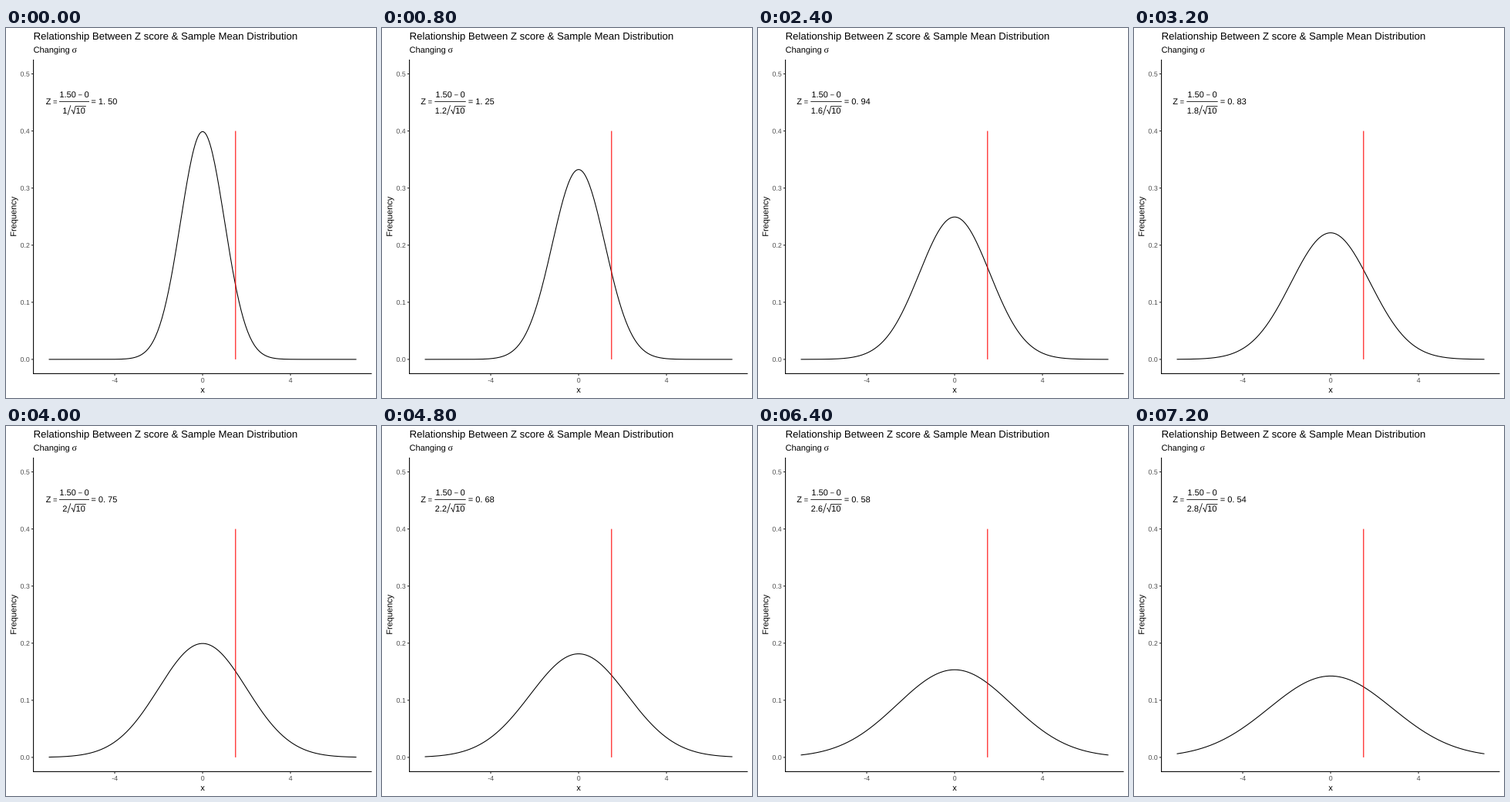
A matplotlib script for the animation above (8 s loop, 480 px wide and 480 px high).

```python
import numpy as np
import matplotlib.pyplot as plt
from matplotlib.animation import FuncAnimation
from matplotlib.patches import PathPatch
from matplotlib.textpath import TextPath
from matplotlib.transforms import Affine2D

SIZE = 480
STEPS = 10
STEP_MS = 800
LINE = 1.07
LEFT, RIGHT, TOP, BOTTOM = 35.6, 474.5, 41, 448.4
DARK, GREY = "#333333", "#4d4d4d"

# At 72 dpi one point is one pixel; the axes use pixel units with y downwards.
fig = plt.figure(figsize=(SIZE / 72, SIZE / 72), dpi=72, facecolor="white")
ax = fig.add_axes([0, 0, 1, 1])
ax.set_xlim(0, SIZE)
ax.set_ylim(SIZE, 0)
ax.axis("off")


def px(x):
    return (LEFT + RIGHT) / 2 + x * (RIGHT - LEFT) / 15.4


def py(y):
    return BOTTOM - (y + 0.025) * (BOTTOM - TOP) / 0.55


def line(xs, ys, color="black", width=LINE):
    return ax.plot(xs, ys, color=color, lw=width, snap=False,
                   solid_capstyle="butt", solid_joinstyle="round")[0]


def glyphs(x, y, s, size=11, align=0, angle=0):
    """Outline of s on baseline (x, y); align 0, 0.5, 1 = left, centre, right."""
    path = TextPath((0, 0), s, size=size, prop={"family": "Liberation Sans"})
    shift = align * path.get_extents().x1
    move = Affine2D().translate(-shift, 0).rotate_deg(angle).scale(1, -1)
    return path.transformed(move.translate(x, y))


def label(*args, color="black", **kw):
    patch = PathPatch(glyphs(*args, **kw), fc=color, lw=0, snap=False)
    return ax.add_patch(patch)


label(LEFT, 15, "Relationship Between Z score & Sample Mean Distribution", 13.2)
label(LEFT, 32, "Changing")
sigma_sign = TextPath((0, 0), "σ", size=12, prop={"family": "Liberation Serif"})
ax.add_patch(PathPatch(
    sigma_sign.transformed(Affine2D().scale(1, -1).translate(85.5, 32)),
    fc="black", lw=0))
label(px(0), 473, "x", align=0.5)
label(13.3, (TOP + BOTTOM) / 2, "Frequency", align=0.5, angle=90)

line([LEFT, LEFT], [TOP, BOTTOM + LINE / 2])
line([LEFT - LINE / 2, RIGHT], [BOTTOM, BOTTOM])
for v in np.arange(6) / 10:
    line([LEFT - 2.74, LEFT - LINE / 2], [py(v)] * 2, DARK)
    label(30.4, py(v) + 3.2, f"{v:.1f}", 8.8, align=1, color=GREY)
for v in (-4, 0, 4):
    line([px(v)] * 2, [BOTTOM + LINE / 2, BOTTOM + 2.74], DARK)
    label(px(v), 460, f"{v}", 8.8, align=0.5, color=GREY)

grid = np.linspace(-7, 7, 281)
curve = line(px(grid), py(0 * grid))
line([px(1.5)] * 2, [py(0), py(0.4)], "red")

# Formula: Z = (1.50 - 0) / (sigma / sqrt(10)) = value
label(69.4, 90, "1.50")
label(93.5, 90, "−", 9.5)
label(101.6, 90, "0")
z_sign, equals, sigma_text, ten, result = (label(0, 0, "0") for _ in range(5))
bar, slash, root = (line([], [], width=0.8) for _ in range(3))


def update(i):
    sigma = round(1 + 0.2 * i, 1)
    pdf = np.exp(-0.5 * (grid / sigma) ** 2) / (sigma * np.sqrt(2 * np.pi))
    curve.set_ydata(py(pdf))

    # A two-digit sigma widens the fraction around its centre.
    digits = f"{sigma:g}"
    wide = len(digits) > 1
    grow = 1.4 if wide else 0
    end = 84 if wide else 79.4
    z_sign.set_path(glyphs(51.7 - grow, 99, "Z"))
    equals.set_path(glyphs(61 - grow, 99, "=", 9.5))
    bar.set_data([69 - grow / 2, 108 + grow / 2], [95.5, 95.5])
    sigma_text.set_path(glyphs(68.7 if wide else 73.3, 111, digits))
    slash.set_data([end + 0.5, end + 4.5], [113, 100.3])
    root.set_data(end + np.array([5.2, 6.4, 8.4, 10.7, 24.4]),
                  [107.3, 106.4, 111.5, 101.5, 101.5])
    ten.set_path(glyphs(end + 11.2, 111, "10"))

    whole, part = f"{1.5 / sigma:.2f}".split(".")
    result.set_path(glyphs(110.4 + grow, 99, f"= {whole}. {part}"))
    return curve, z_sign, equals, bar, sigma_text, slash, root, ten, result


anim = FuncAnimation(fig, update, frames=STEPS, interval=STEP_MS,
                     repeat=True, repeat_delay=0)
plt.show()
```
